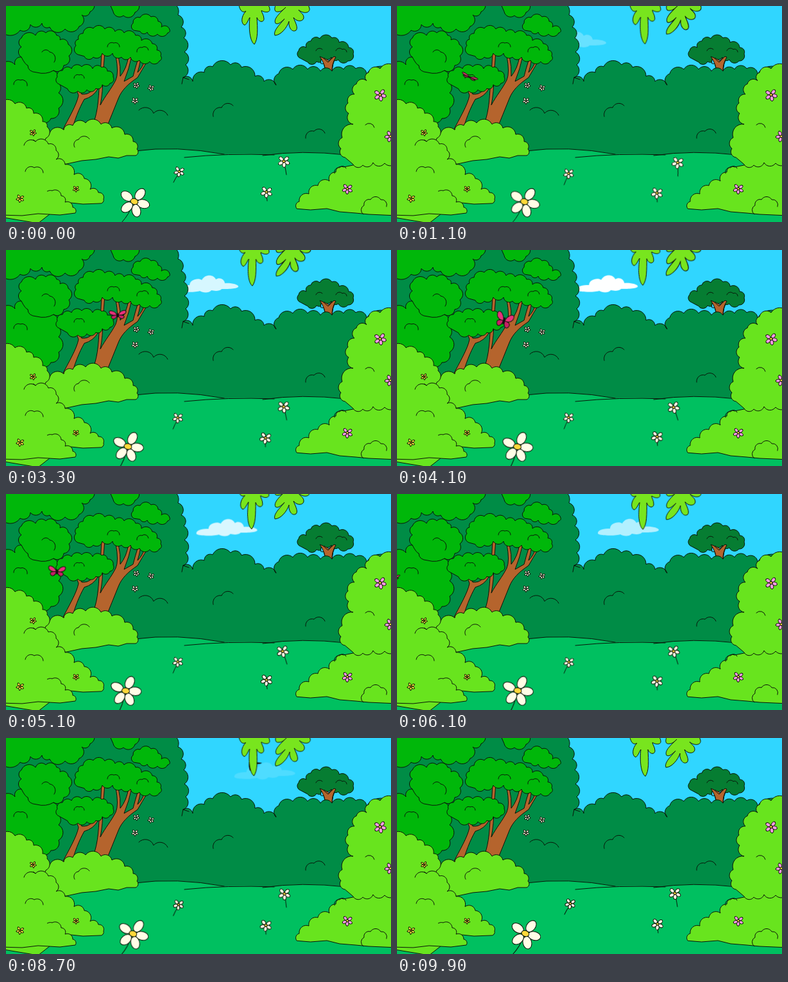
An HTML page for the animation above (10 s loop, 600 px wide and 338 px high).

```html
<!DOCTYPE html>
<html lang="en">
<head>
<meta charset="utf-8">
<title>Forest clearing</title>
<style>
html, body { margin: 0; width: 100%; height: 100%; overflow: hidden; background: #30d6ff; }
svg { display: block; width: 100vw; height: 100vh; }
path, ellipse { vector-effect: non-scaling-stroke; }
.ink { stroke: #0a1408; stroke-width: 1; stroke-linejoin: round; stroke-linecap: round; }
.line { fill: none; }

.cloud { animation: drift 10s linear infinite, fade 10s linear infinite; }
.bird { animation: fly 10s linear infinite; }
.butterfly { animation: roam 10s ease-in-out infinite; }
.wings { animation: flap calc(10s / 44) ease-in-out infinite alternate; }
.beat { animation: beat .2s ease-in-out infinite alternate; }
.sway { animation: 10s cubic-bezier(.37, 0, .63, 1) infinite; }
.leaf1 { animation-name: leaf1; transform-origin: 387px -20px; }
.leaf2 { animation-name: leaf2; transform-origin: 448px -20px; }
.big { animation-name: big; }
.left { animation-name: left; }
.right { animation-name: right; }
.mid { animation-name: mid; animation-duration: 5s; }

@keyframes drift {
  from { transform: translate(260px, 56px); }
  to { transform: translate(424px, 53px); }
}
@keyframes fade { 0%, 95%, 100% { opacity: 0; } 41% { opacity: 1; } }
@keyframes fly {
  0%, 74% { transform: translate(615px, 60px); }
  76% { transform: translate(575px, 57px); }
  95%, 100% { transform: translate(250px, 35px); }
}
@keyframes beat { to { transform: scaleY(.35); } }
@keyframes roam {
  0%, 1% { transform: translate(-18px, 128px) rotate(-10deg); }
  11% { transform: translate(113px, 111px) rotate(24deg); }
  18% { transform: translate(160px, 90px) rotate(-5deg); }
  25% { transform: translate(181px, 93px) rotate(-22deg); }
  41% { transform: translate(167px, 110px) rotate(18deg); }
  61% { transform: translate(-8px, 132px) rotate(-12deg); }
  64%, 100% { transform: translate(-25px, 136px) rotate(-12deg); }
}
@keyframes flap { to { transform: scaleY(.22); } }
@keyframes leaf1 { 50% { transform: translate(0, -5px) rotate(3deg); } }
@keyframes leaf2 {
  25% { transform: translate(2px, -5px) rotate(-1deg); }
  50% { transform: translate(0, -7px); }
  76% { transform: translate(2px, -4px); }
}
@keyframes big {
  0%, 100% { transform: translate(200px, 306px); }
  50% { transform: translate(186.5px, 308px) rotate(-12deg); }
}
@keyframes left {
  0%, 100% { transform: translate(270px, 259px); }
  11%, 41% { transform: translate(267.5px, 262px) rotate(-6deg); }
  25%, 61% { transform: translate(268px, 263px) rotate(-4deg); }
  76% { transform: translate(268px, 262px) rotate(-5deg); }
}
@keyframes right {
  0%, 100% { transform: translate(433px, 243px); }
  11% { transform: translate(437.5px, 245px) rotate(10deg); }
  25%, 76% { transform: translate(434.5px, 244.5px) rotate(4deg); }
  41%, 61% { transform: translate(431px, 246px) rotate(-8deg); }
}
@keyframes mid {
  0%, 100% { transform: translate(406px, 291px); }
  50% { transform: translate(404px, 295px) rotate(6deg); }
}
</style>
</head>
<body>
<svg id="stage" viewBox="0 0 600 338" preserveAspectRatio="none"></svg>
<script>
const DARK = '#008c46', MID = '#00b70a', LIGHT = '#68e41e', GRASS = '#00c060', BARK = '#b5642d';

// Joins points by round bumps; an "l" before a point makes its edge straight.
function bumps(points) {
  let px, py;
  return points.trim().split(/\s+/).map((item, i) => {
    const straight = item[0] === 'l';
    const [x, y] = item.replace('l', '').split(',').map(Number);
    const r = (Math.hypot(x - px, y - py) * .58).toFixed(1);
    px = x; py = y;
    if (!i) return `M${x} ${y}`;
    return straight ? `L${x} ${y}` : `A${r} ${r} 0 0 1 ${x} ${y}`;
  }).join('');
}

const shape = (fill, d) => `<path class="ink" fill="${fill}" d="${d}"/>`;
const line = d => `<path class="ink line" d="${d}"/>`;
const bush = (fill, points) => shape(fill, bumps(points) + 'Z');
const fold = points => line(bumps(points));

function bloom(scale, petal, core, turn = 0, stem = '') {
  const petals = [-52, 15, 78, 142, 216].map(a =>
    `<ellipse class="ink" cx="14.5" rx="10" ry="6.8" fill="${petal}" transform="rotate(${a + turn})"/>`).join('');
  return (stem && line(stem)) + `<g transform="scale(${scale})">${petals}
    <ellipse class="ink" rx="6" ry="4.5" fill="${core}" transform="rotate(20)"/></g>`;
}
const daisy = (name, scale, stem, turn) =>
  `<g class="sway ${name}">${bloom(scale, '#fffde6', '#ffd83a', turn, stem)}</g>`;
const dot = (x, y, scale, petal, core, turn) =>
  `<g transform="translate(${x} ${y})" style="stroke-width:.7">${bloom(scale, petal, core, turn)}</g>`;

const sky = `<rect width="600" height="338" fill="#30d6ff"/>
  <path class="cloud" fill="#fff" d="M-47 8C-48 2-38 0-28 0C-28-9-14-12-9-8C-5-17 9-18 13-9C18-13 26-10 27-3C36-4 48-1 48 2C48 6 30 6 22 6C18 10 10 9 6 8C2 13-8 12-12 9C-20 12-44 11-47 8Z"/>
  <g class="bird"><path class="beat" fill="#111" d="M-8-9Q4-10 12-8Q12-5-3-4L-2 9Q-5 12-7 9Q-9 0-8-9Z"/></g>`;

const farTree =
  shape(BARK, 'M498 106Q498 92 488 76L493 75L503 86L511 76L516 78Q507 90 509 106Z') +
  bush('#067d32', '459,82 456,70 468,65 475,55 489,51 508,50 519,57 534,65 541,75 533,86 518,84 507,80 496,81 484,87 470,88') +
  shape('#30d6ff', 'M491 84L498 87L497 91L491 90Z') +
  shape(BARK, 'M498 104Q498 92 489 79L494 81L502 88L511 79L514 80Q507 91 508 104Z') +
  fold('483,70 493,68') + fold('514,70 524,68 531,72');

const hedge =
  bush(DARK, `-20,-20 253,-6 268,14 273,33 277,50 278,72 280,92 276,112 291,118 309,104 322,95 350,92
    367,96 388,110 402,118 421,124 425,106 447,99 470,99 490,102 508,102 526,99 545,98 562,106 610,110 610,400 -20,400`) +
  line('M276 112L285 115M274 122L276 112') +
  fold('207,163 230,168 252,171') + fold('323,173 336,159 354,156') + fold('467,207 480,196 497,199');

const meadow =
  `<path fill="${GRASS}" d="M0 230L205 227Q265 218 340 232Q380 230 415 233Q460 225 530 233L600 235V338H0Z"/>` +
  line('M200 227Q265 218 340 232') + line('M278 237Q345 230 418 233') + line('M400 234Q460 225 530 233');

const canopies =
  bush(MID, '-20,-20 134,-10 131,9 118,14 114,32 92,36 68,33 56,27 38,29 22,38 -10,36') +
  bush(MID, '160,-8 204,-8 201,10 183,15 167,9') +
  bush(MID, '199,38 198,27 209,18 226,17 237,24 242,33 255,37 252,42 236,44 220,41 209,40');

const thicket =
  bush(MID, `-10,95 14,92 24,80 24,64 24,50 46,46 62,42 79,46 84,53 97,60 98,78 90,93 74,101
    78,118 82,136 82,160 70,176 50,179 30,200 -10,200`) +
  fold('12,123 22,116 33,125') + fold('56,72 68,72 75,88') + line('M24 80Q30 92 34 93Q34 103 48 104Q62 108 74 101');

const trees =
  shape(BARK, 'M134 190C146 160 143 140 147 110L149 70L154 72L151 110Q151 135 147 155C155 140 164 130 171 116Q176 105 171 78L175 78Q179 95 178 110Q188 98 191 78L196 78Q192 98 184 118L198 110Q201 98 206 82L210 82Q208 95 205 104Q214 95 216 84L221 85Q212 100 205 112C190 122 180 132 175 145Q165 170 156 192Z') +
  shape(BARK, 'M86 198C98 175 110 155 113 140Q112 135 108 130L113 128L118 138L122 138Q130 138 138 128L143 130Q136 142 122 146C114 160 106 180 102 198Z') +
  bush(MID, `112,76 109,62 113,52 120,43 136,35 154,36 170,40 184,42 202,46 211,54 228,59 235,69
    241,78 239,86 224,87 208,85 194,80 180,80 166,74 150,74 136,80 122,79`) +
  fold('158,64 168,58 177,64') + fold('204,72 212,65 222,69') +
  bush(MID, '82,122 80,111 88,101 102,98 118,95 135,98 149,96 158,102 167,111 162,121 150,123 140,129 126,131 112,133 96,130') +
  fold('106,113 114,108 122,113');

const leftBushes =
  bush(LIGHT, `62,215 68,199 90,194 104,187 124,183 148,185 165,191 185,201 198,212 204,224 202,234
    l188,234 l175,238 l160,236 l140,240 l118,242 l95,247 l62,250`) +
  fold('107,221 113,209 130,208') +
  bush(LIGHT, '-10,153 14,153 32,160 43,168 57,181 64,189 62,207 l40,260 l-10,260') +
  bush(LIGHT, `28,216 46,212 66,216 78,226 78,240 92,248 106,264 122,270 131,287 144,292 152,302 146,309
    l120,310 l92,307 l50,340 l-10,330 l-10,222`) +
  `<path fill="${LIGHT}" d="M0 200H42V235H0Z"/>` +
  bush(LIGHT, '-10,290 l60,300 72,289 86,297 92,307 104,315 108,324 l84,327 l50,325 l25,328 l-10,327') +
  `<path fill="${LIGHT}" d="M0 270H64V309H0Z"/>` +
  fold('28,218 46,212') + fold('30,259 44,253 58,261');

const rightBushes =
  bush(LIGHT, `453,317 457,306 472,294 486,281 504,274 514,260 526,252 l610,235 l610,328 l565,326 l545,324
    l520,322 l500,317 l475,319`) +
  bush(LIGHT, `528,237 522,223 524,206 541,185 534,168 533,152 543,138 546,122 562,117 565,104 583,98 610,98
    l610,242 590,246 572,245 556,249 541,248`) +
  fold('557,326 558,312 568,303 584,303 593,314') + fold('512,262 520,253 530,254') + fold('560,186 574,190');

const flowers = [
  [42, 198, .21, '#ffe23c', '#f28a1c', 0], [22, 301, .25, '#ffe23c', '#f28a1c', 20], [109, 286, .2, '#ffe23c', '#f28a1c', 10],
  [203, 124, .2, '#fffde6', '#f0a0a0', 0], [226, 128, .2, '#fffde6', '#f0a0a0', 25], [201, 148, .21, '#fffde6', '#f0a0a0', 12],
  [583, 139, .4, '#ff9be4', '#ffd83a', 0], [532, 286, .34, '#ff9be4', '#ffd83a', 15], [599, 204, .36, '#ff9be4', '#ffd83a', 30]
].map(f => dot(...f)).join('');

const daisies =
  daisy('left', .34, 'M-1 4Q-6 10-9 17', 20) +
  daisy('right', .39, 'M1 5Q3 13 4 21', 8) +
  daisy('mid', .38, 'M0 5L1 14', 15) +
  daisy('big', 1, 'M-3 5Q-8 20-20 33', 0);

const wing = side => `<g transform="scale(${side} 1)">
  <path class="ink" fill="#e9307c" d="M1 1C3-10 11-14 13-10C14-4 11 1 1 2Z"/>
  <path class="ink" fill="#c91f66" d="M1 1C9 0 12 4 9 9C6 13 2 9 1 2Z"/></g>`;
const butterfly = `<g class="butterfly"><g class="wings">${wing(1)}${wing(-1)}
  <ellipse rx="1.6" ry="6" cy="1" fill="#1a0a12"/></g></g>`;

const fronds =
  `<g class="sway leaf1">${shape('#78e51e', 'M362-12C362 6 368 12 374 8C366 16 366 28 372 30C376 28 378 20 380 18C378 35 380 55 387 60C393 52 392 35 391 18C394 26 402 26 402 20C402 14 398 10 398 7C404 11 412 10 411 5C411 0 406-4 404-12Z')}</g>` +
  `<g class="sway leaf2">${shape('#78e51e', 'M425-12C418 0 416 10 424 9C430 9 434 4 436 2C428 10 416 20 420 27C424 30 430 24 434 20C428 28 416 38 419 46C428 46 438 34 441 24C440 34 446 42 452 38C456 34 450 24 448 18C454 26 464 24 464 18C464 12 458 10 456 6C462 12 474 12 473 4L468-12Z')}</g>`;

document.getElementById('stage').innerHTML = [
  sky, farTree, hedge, meadow, canopies, thicket, trees,
  leftBushes, rightBushes, flowers, daisies, butterfly, fronds
].join('');
</script>
</body>
</html>
```
